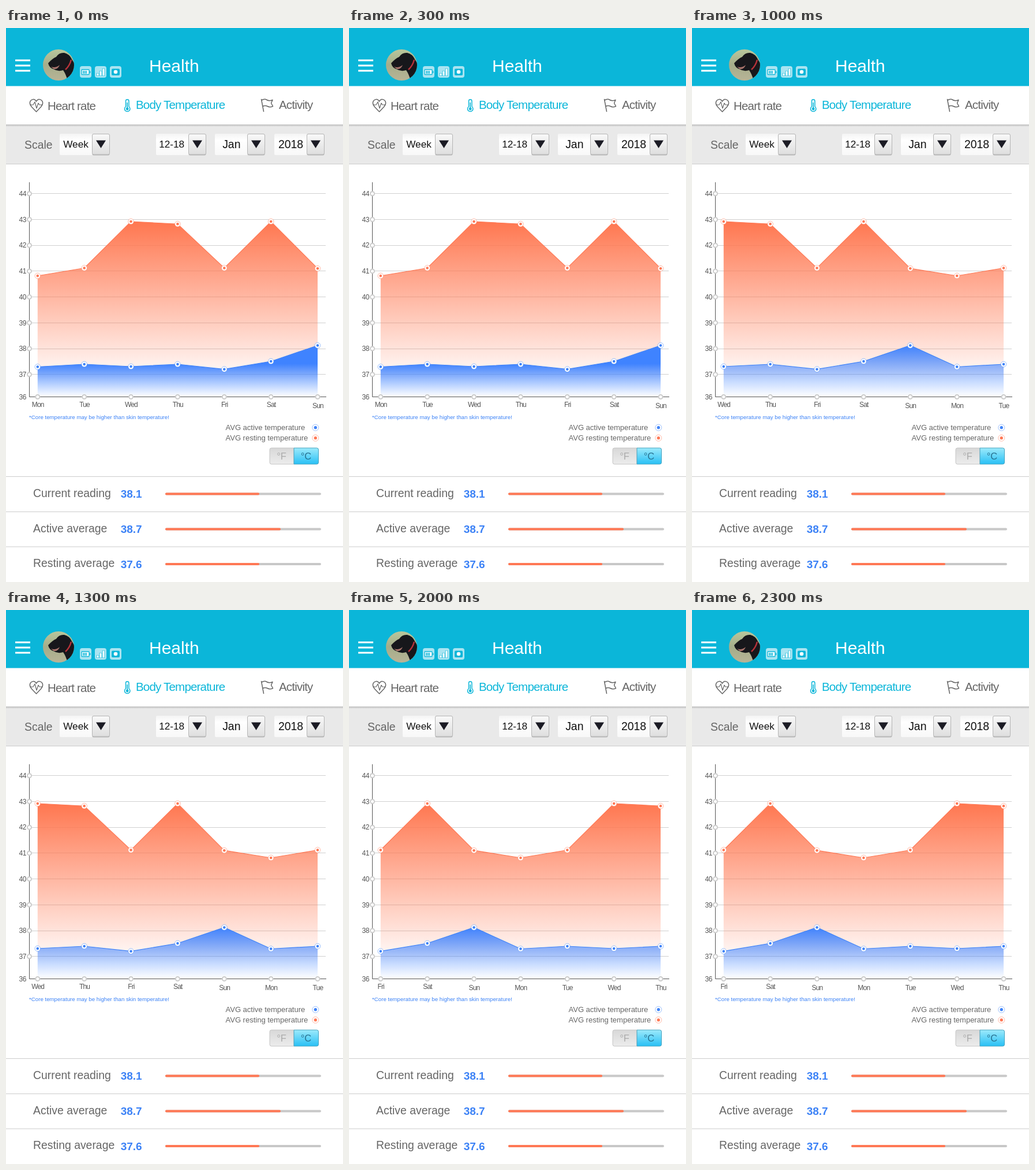
An HTML page for the animation above (2500 ms loop, 584 px wide and 959 px high).

```html
<!DOCTYPE html>
<html lang="en">
<head>
<meta charset="utf-8">
<title>Health</title>
<style>
  html, body { margin: 0; width: 100%; height: 100%; overflow: hidden; background: #fff; }
  svg { display: block; width: 584px; height: 959px; }
  text { font-family: "Liberation Sans", Arial, sans-serif; fill: #666; }
  .mid { text-anchor: middle; }
  .tab { font-size: 20.5px; letter-spacing: -.8px; }
  .axis { font-size: 12px; letter-spacing: -.4px; fill: #555; }
  .day { font-size: 12px; letter-spacing: -.8px; fill: #555; text-anchor: middle; }
  .row { font-size: 19.4px; }
  .value { font-size: 19px; font-weight: bold; fill: #3c82f6; }
  .line { fill: none; stroke-width: 1.5; stroke-linecap: round; stroke-linejoin: round; }
</style>
</head>
<body>
<svg id="stage" viewBox="0 0 584 959">
  <defs>
    <linearGradient id="restFill" gradientUnits="userSpaceOnUse" x1="0" y1="335" x2="0" y2="612">
      <stop offset="0" stop-color="#ff7750"/>
      <stop offset="1" stop-color="#ff7750" stop-opacity="0"/>
    </linearGradient>
    <linearGradient id="activeFill" gradientUnits="userSpaceOnUse" x1="0" y1="549" x2="0" y2="638">
      <stop id="solid" offset="0" stop-color="#3f83ff"/>
      <stop offset="1" stop-color="#3f83ff" stop-opacity="0"/>
    </linearGradient>
    <linearGradient id="tabShade" x2="0" y2="1">
      <stop offset="0" stop-color="#bbb"/>
      <stop offset="1" stop-color="#e9e9e9"/>
    </linearGradient>
    <linearGradient id="button" x2="0" y2="1">
      <stop offset="0" stop-color="#f9f9f9"/>
      <stop offset="1" stop-color="#dedede"/>
    </linearGradient>
    <linearGradient id="field" x2="0" y2="1">
      <stop offset="0" stop-color="#f4f4f4"/>
      <stop offset=".3" stop-color="#fff"/>
      <stop offset="1" stop-color="#f8f8f8"/>
    </linearGradient>
    <linearGradient id="off" x2="0" y2="1">
      <stop offset="0" stop-color="#d8d8d8"/>
      <stop offset="1" stop-color="#ececec"/>
    </linearGradient>
    <linearGradient id="on" x2="0" y2="1">
      <stop offset="0" stop-color="#9ceafb"/>
      <stop offset="1" stop-color="#28c0f5"/>
    </linearGradient>
    <linearGradient id="grass" x2="0" y2="1">
      <stop offset="0" stop-color="#b9c79c"/>
      <stop offset=".5" stop-color="#a5ad8a"/>
      <stop offset="1" stop-color="#b8b496"/>
    </linearGradient>
    <clipPath id="round"><circle cx="91" cy="64" r="27"/></clipPath>
  </defs>

  <rect width="584" height="959" fill="#fff"/>

  <!-- header -->
  <rect width="584" height="100.5" fill="#0bb6d9"/>
  <path d="M16 56H42M16 65H42M16 74H42" stroke="#fff" stroke-width="3"/>
  <g clip-path="url(#round)">
    <rect x="64" y="37" width="54" height="54" fill="url(#grass)"/>
    <path d="M73 61Q80 53 87 50Q92 42 101 43Q110 45 114 54L119 62V92H107Q104 80 99 73Q90 76 82 71Q75 69 73 61Z" fill="#17171b"/>
    <path d="M78 67Q86 70 93 64Q90 72 83 71Z" fill="#a9746c"/>
    <path d="M103 72Q110 66 113 55" fill="none" stroke="#b8323a" stroke-width="2.5"/>
  </g>
  <g fill="#a9e4f1">
    <rect x="128" y="66" width="20" height="20" rx="4"/>
    <rect x="154" y="66" width="20" height="20" rx="4"/>
    <rect x="180" y="66" width="20" height="20" rx="4"/>
  </g>
  <rect x="131" y="72" width="13" height="8.5" rx="1" fill="#fff" stroke="#0bb6d9" stroke-width="1.3"/>
  <path d="M145.6 74.5V78M134 74V79M136.5 74V79M139 74V79" stroke="#0bb6d9" stroke-width="1.6"/>
  <path d="M159 83V78M164 83V74M169 83V70" stroke="#0bb6d9" stroke-width="4.4"/>
  <path d="M159 82.5V78.5M164 82.5V74.5M169 82.5V70.5" stroke="#fff" stroke-width="3"/>
  <rect x="183" y="70.5" width="14" height="11.5" rx="2" fill="#0bb6d9"/>
  <circle cx="190" cy="76" r="3.3" fill="#fff"/>
  <text x="248" y="76" font-size="30" style="fill:#fff">Health</text>

  <!-- tabs -->
  <g class="line" stroke="#666">
    <path d="M52.5 145L44 136Q39 129 43.500 125Q49 121 52.500 127Q56 121 61.500 125Q66 129 61 136Z"/>
    <path d="M42 133H47L50 128L53 139L56 130L58 133H63" stroke-width="1.2"/>
    <path d="M442.500 123.500L446.500 144.500M443 125Q448 122 452 124.500Q456 127 462 124.500L459.500 130L462.500 135.500Q457 138 453 135.500Q449 133.500 445 135.500"/>
  </g>
  <path class="line" d="M207.500 136V126.500a2.700 2.700 0 0 1 5.400 0V136a4.700 4.700 0 1 1 -5.400 0Z" stroke="#0bb6d9"/>
  <path d="M210.200 129V139" stroke="#0bb6d9" stroke-width="1.6"/>
  <circle cx="210.200" cy="140" r="2.400" fill="#0bb6d9"/>
  <text class="tab" x="72" y="142">Heart rate</text>
  <text class="tab" x="225" y="139.500" style="fill:#0bb6d9">Body Temperature</text>
  <text class="tab" x="473" y="139.500">Activity</text>

  <!-- filters -->
  <rect y="167" width="584" height="68" fill="#e9e9e9"/>
  <rect y="167" width="584" height="4" fill="url(#tabShade)"/>
  <path d="M0 235.500H584" stroke="#ccc"/>
  <text x="32" y="208.500" font-size="19.400">Scale</text>
  <g id="filters"></g>

  <g id="axes"></g>
  <g id="plot"></g>
  <g id="ticks"></g>

  <text x="40" y="677" font-size="9.700" style="fill:#3c82f6">*Core temperature may be higher than skin temperature!</text>
  <text x="380.500" y="696" font-size="13">AVG active temperature</text>
  <text x="380.500" y="714" font-size="13">AVG resting temperature</text>
  <g id="legend"></g>

  <!-- unit switch -->
  <path d="M499 727H460Q457 727 457 730V752Q457 755 460 755H499Z" fill="url(#off)" stroke="#c4c4c4"/>
  <path d="M499 727H538.500Q541.500 727 541.500 730V752Q541.500 755 538.500 755H499Z" fill="url(#on)" stroke="#48a3bf"/>
  <text class="mid" x="477.500" y="747" font-size="16.500" style="fill:#aaa">°F</text>
  <text class="mid" x="520" y="747" font-size="16.500" style="fill:#27718f">°C</text>

  <g id="rows"></g>
</svg>
<script>
const $ = id => document.getElementById(id);
const ORANGE = "#ff7855", BLUE = "#3f83f8";
const STEP = 500;
const BASE = 638.5;

const days = ["Mon", "Tue", "Wed", "Thu", "Fri", "Sat", "Sun"];
const resting = [429, 415.5, 335, 339.3, 415.5, 335, 416.2];
const active = [586.5, 582, 586, 582, 590.7, 577, 549.5];
const slotX = i => 54.8 + i * 80.87;

const knob = (x, y) =>
  `<circle cx="${x}" cy="${y}" r="3.5" fill="#fff" stroke="#ccc" stroke-width="2"/>`;

const dot = (x, y, color, r = 4.8) =>
  `<circle cx="${x}" cy="${y}" r="${r}" fill="#fff" stroke="${color}" stroke-opacity=".5"/>` +
  `<circle cx="${x}" cy="${y}" r="${r * .48}" fill="${color}"/>`;

function picker(x, label, mid, size) {
  const b = x + 56;
  return `<rect x="${x}" y="183" width="57" height="37" rx="2" fill="url(#field)"/>
    <rect x="${b + .5}" y="183.5" width="30" height="37" rx="2.5" fill="#999" opacity=".6"/>
    <rect x="${b + .5}" y="183.5" width="30" height="35.5" rx="2.5" fill="url(#button)" stroke="#b5b5b5"/>
    <path d="M${b + 7} 194.500h17l-8.500 13.500z" fill="#1b1b24"/>
    <text class="mid" x="${mid}" y="${size > 18 ? 208 : 207}" font-size="${size}" style="fill:#111">${label}</text>`;
}

function row(y, label, value, end) {
  return `<path d="M0 ${y - 30}H584" stroke="#ccc"/>
    <text class="row" x="47" y="${y + 5}">${label}</text>
    <text class="value" x="198.700" y="${y + 6.8}">${value}</text>
    <path d="M278 ${y}H544" stroke="#c8c8c8" stroke-width="4" stroke-linecap="round"/>
    <path d="M278 ${y}H${end}" stroke="${ORANGE}" stroke-width="4" stroke-linecap="round"/>`;
}

function axes() {
  let grid = "", knobs = "";
  for (let v = 44; v >= 36; v--) {
    const y = v > 36 ? 286.8 + (44 - v) * 44.7 : BASE;
    if (v > 36) {
      grid += `<path d="M40 ${Math.floor(y) + .5}H554" stroke="#d0d0d0"/>`;
      knobs += knob(40.5, y);
    }
    grid += `<text class="axis" x="22.500" y="${y + 4.2}">${v}</text>`;
  }
  $("axes").innerHTML = grid +
    `<path d="M40.500 267V638.500H555" fill="none" stroke="#555"/>` + knobs;
}

function series(ys, color, fill) {
  const pts = ys.map((y, i) => `${slotX(i)},${y}`).join(" ");
  return `<polygon points="${slotX(0)},${BASE} ${pts} ${slotX(6)},${BASE}" fill="url(#${fill})"/>
    <polyline points="${pts}" fill="none" stroke="${color}" stroke-width="1.200"/>` +
    ys.map((y, i) => dot(slotX(i), y, color)).join("");
}

function drawWeek(start) {
  const turn = list => list.map((_, i) => list[(i + start) % 7]);
  $("solid").setAttribute("offset", start ? 0 : .36);
  $("plot").innerHTML =
    series(turn(resting), ORANGE, "restFill") + series(turn(active), BLUE, "activeFill");
  // labels from Sunday on sit a little lower
  $("ticks").innerHTML = turn(days).map((d, i) => knob(slotX(i), BASE) +
    `<text class="day" x="${slotX(i) + .4}" y="${i + start < 6 ? 655.7 : 658}">${d}</text>`).join("");
}

$("filters").innerHTML =
  picker(93, "Week", 121, 17.2) + picker(260, "12-18", 287.2, 17.2) +
  picker(362, "Jan", 390.8, 19.4) + picker(465, "2018", 493.5, 19.4);
$("legend").innerHTML = dot(536.3, 691.7, BLUE, 5.5) + dot(536.3, 709.7, ORANGE, 5.5);
$("rows").innerHTML =
  row(806.5, "Current reading", "38.1", 437) +
  row(867.5, "Active average", "38.7", 474) +
  row(928, "Resting average", "37.6", 437);
axes();

let shown = -1;
const begin = performance.now();
function tick() {
  const start = Math.floor((performance.now() - begin) / STEP) % 5;
  if (start !== shown) drawWeek(shown = start);
  requestAnimationFrame(tick);
}
tick();
</script>
</body>
</html>
```
